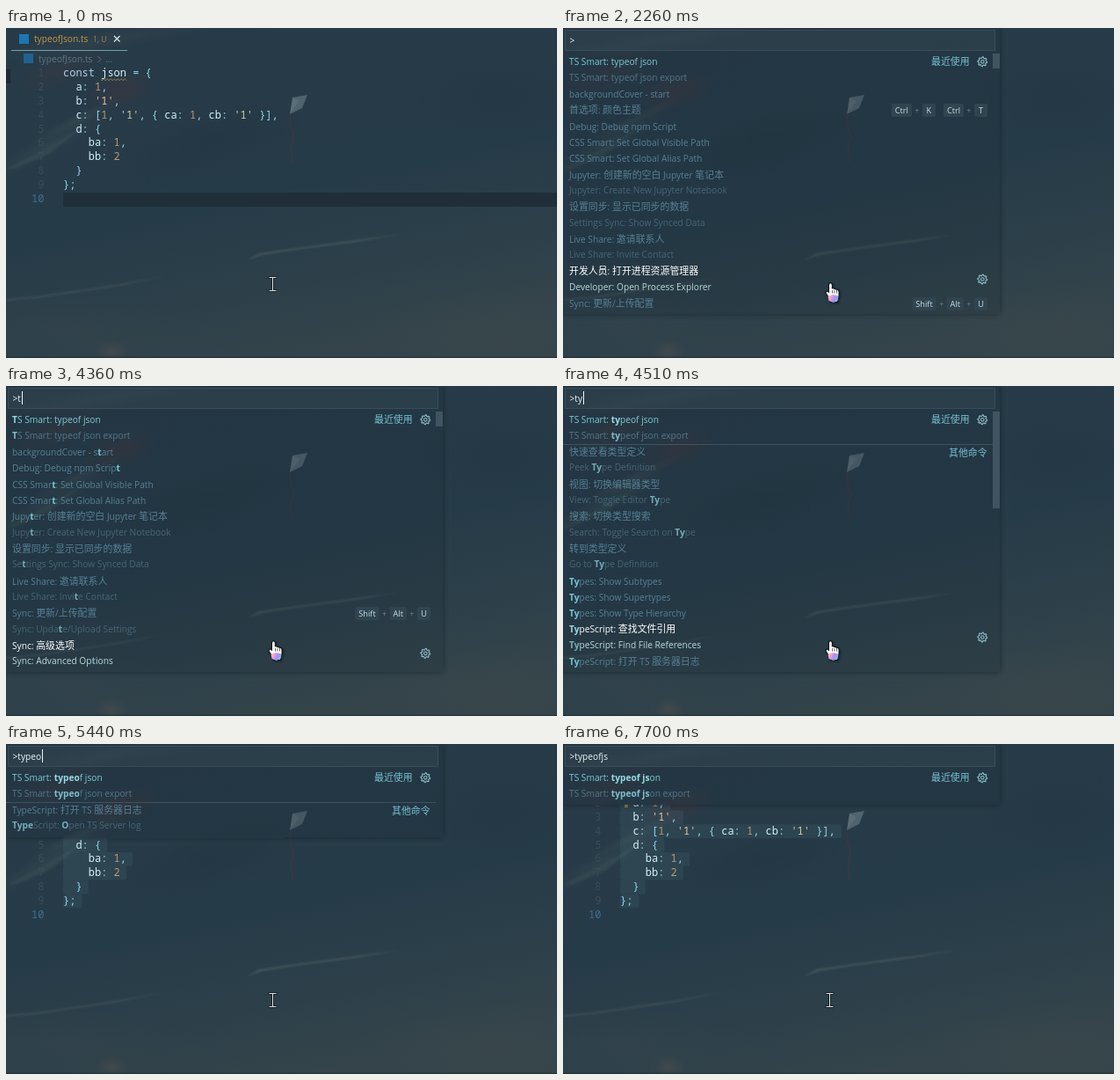
An HTML page with a canvas for the animation above (8000 ms loop, 627x375 px).

```html
<!DOCTYPE html>
<html lang="en">
<head>
<meta charset="utf-8">
<title>Command palette</title>
<style>
html, body { margin: 0; width: 100%; height: 100%; overflow: hidden; background: #263a47; }
canvas { display: block; }
</style>
</head>
<body>
<canvas id="stage" width="627" height="375"></canvas>
<script>
const W = 627, H = 375, LOOP = 8000;
const ctx = document.getElementById('stage').getContext('2d');
const LATIN = '"Open Sans", "Noto Sans", sans-serif';
const CJK = '"Noto Sans CJK SC", "Noto Sans CJK", sans-serif';
const MONO = '12px "Noto Sans Mono", "DejaVu Sans Mono", monospace';
const CHAR = 7.2, LINE = 15.83, ROW = 18.33;

function rect(c, x, y, w, h, color, r = 0) {
  c.fillStyle = color;
  c.beginPath();
  c.roundRect(x, y, w, h, r);
  c.fill();
}

function poly(c, pts, color) {
  c.fillStyle = color;
  c.beginPath();
  for (let i = 0; i < pts.length; i += 2) c.lineTo(pts[i], pts[i + 1]);
  c.closePath();
  c.fill();
}

// Latin and Chinese runs use their own font; returns the end x.
function text(str, x, y, color, { size = 10.2, weight = 400 } = {}) {
  ctx.fillStyle = color;
  for (const run of str.match(/[\u4e00-\u9fff]+|[^\u4e00-\u9fff]+/g) || []) {
    const han = run.charCodeAt(0) > 0x4dff;
    ctx.font = `${weight} ${han ? size * 1.07 : size}px ${han ? CJK : LATIN}`;
    ctx.fillText(run, x, y + 3.7);
    x += ctx.measureText(run).width;
  }
  return x;
}

// ---- backdrop, painted once ----
function paintBackdrop() {
  const cv = document.createElement('canvas');
  cv.width = W;
  cv.height = H;
  const c = cv.getContext('2d');
  const sky = c.createLinearGradient(260, 0, 340, H);
  sky.addColorStop(0, '#273a47');
  sky.addColorStop(0.5, '#263b48');
  sky.addColorStop(0.78, '#2d404a');
  sky.addColorStop(1, '#34444a');
  c.fillStyle = sky;
  c.fillRect(0, 0, W, H);

  const glow = (x, y, rx, ry, turn, rgb, a) => {
    c.save();
    c.translate(x, y);
    c.rotate(turn);
    c.scale(rx, ry);
    const g = c.createRadialGradient(0, 0, 0, 0, 0, 1);
    g.addColorStop(0, `rgba(${rgb},${a})`);
    g.addColorStop(1, `rgba(${rgb},0)`);
    c.fillStyle = g;
    c.fillRect(-1, -1, 2, 2);
    c.restore();
  };
  glow(130, 72, 46, 20, -0.3, '110,45,48', 0.2);
  glow(60, 48, 60, 20, -0.4, '105,55,55', 0.14);
  glow(110, 14, 130, 12, -0.15, '80,92,98', 0.2);
  glow(45, 135, 85, 12, -0.5, '95,125,115', 0.13);
  glow(80, 105, 60, 7, -0.45, '120,140,120', 0.12);
  glow(230, 130, 120, 40, -0.3, '25,45,60', 0.25);
  glow(120, 367, 20, 13, 0, '105,90,82', 0.3);
  glow(60, 340, 150, 40, 0, '60,72,76', 0.25);
  glow(560, 350, 160, 60, 0, '66,76,78', 0.25);
  glow(560, 80, 120, 60, 0, '32,50,66', 0.3);

  c.filter = 'blur(.8px)';
  poly(c, [274, 264, 288, 256, 330, 250, 398, 241, 450, 234, 400, 243, 330, 252, 292, 258], 'rgba(125,135,128,.3)');
  poly(c, [0, 308, 35, 305, 130, 291, 185, 281, 130, 293, 35, 307, 0, 310], 'rgba(125,130,122,.24)');
  poly(c, [0, 160, 40, 140, 88, 112, 50, 143, 10, 160], 'rgba(120,145,130,.1)');
  c.filter = 'blur(.5px)';
  poly(c, [326, 79, 343, 76, 337, 91, 323, 98], 'rgba(125,145,152,.48)');
  poly(c, [326, 79, 334, 83, 323, 98], 'rgba(170,180,180,.12)');
  c.strokeStyle = 'rgba(110,52,62,.24)';
  c.lineWidth = 2;
  c.beginPath();
  c.moveTo(324, 98);
  c.bezierCurveTo(320, 115, 332, 120, 325, 132);
  c.bezierCurveTo(322, 140, 328, 145, 326, 154);
  c.stroke();
  c.filter = 'none';
  rect(c, 0, 373.5, W, 1.5, 'rgba(20,30,38,.35)');
  return cv;
}
const backdrop = paintBackdrop();

// ---- editor ----
const CODE = [
  'const json = {', '  a: 1,', "  b: '1',", "  c: [1, '1', { ca: 1, cb: '1' }],",
  '  d: {', '    ba: 1,', '    bb: 2', '  }', '};', ''
];
const lineY = i => 51 + i * LINE;

function tokenColor(tok) {
  if (tok === 'const') return '#b3cde6';
  if (/^\d/.test(tok)) return '#c09672';
  if (/^'/.test(tok)) return '#dccb9c';
  if (/^\w/.test(tok)) return '#d3f1f7';
  return '#8fd6e8';
}

function drawSelection(color) {
  CODE.slice(0, 9).forEach((s, i) =>
    rect(ctx, 65, lineY(i) - 7.2, (s.length + 1) * CHAR, LINE, color, 2));
}

function drawCode() {
  CODE.forEach((s, i) => {
    const base = lineY(i) + 4.3;
    ctx.font = MONO;
    ctx.textAlign = 'right';
    ctx.fillStyle = i === 9 ? '#416f91' : '#3a4d59';
    ctx.fillText(i + 1, 43.5, base);
    ctx.textAlign = 'left';
    for (const m of s.matchAll(/'\d'|\w+|[^\w\s']/g)) {
      ctx.fillStyle = tokenColor(m[0]);
      ctx.fillText(m[0], 65 + m.index * CHAR, base);
    }
  });
  ctx.strokeStyle = '#a58748';
  ctx.lineWidth = 0.9;
  ctx.beginPath();
  for (let x = 108; x <= 137; x++) ctx.lineTo(x, 58.7 + Math.sin(x * 1.57));
  ctx.stroke();
}

function drawTab() {
  rect(ctx, 15, 7, 11, 11, '#1c77b2');
  text('typeofJson.ts', 32, 12.5, '#bf9a48');
  text('1, U', 99, 12.5, '#a3863f', { size: 8.6 });
  ctx.strokeStyle = '#dce6ea';
  ctx.lineWidth = 1.2;
  ctx.beginPath();
  ctx.moveTo(123, 9); ctx.lineTo(129.5, 15.5);
  ctx.moveTo(129.5, 9); ctx.lineTo(123, 15.5);
  ctx.stroke();
  rect(ctx, 6, 25, 132, 1, '#6fa3ad');
  rect(ctx, 20, 29, 11, 11, '#20638f');
  text('typeofJson.ts', 37, 35.5, '#5f7884');
  ctx.strokeStyle = '#5f7884';
  ctx.lineWidth = 1;
  ctx.beginPath();
  ctx.moveTo(104.5, 32); ctx.lineTo(108, 35.5); ctx.lineTo(104.5, 39);
  ctx.stroke();
  text('...', 113, 35.5, '#5f7884');
  rect(ctx, 0, 47, 5, 16, 'rgba(22,34,43,.6)');
}

function drawBulb() {
  ctx.fillStyle = '#e0bd2c';
  ctx.beginPath();
  ctx.arc(72, 64.8, 3.9, 0, 7);
  ctx.fill();
  rect(ctx, 70.2, 67, 3.6, 2.8, '#e0bd2c');
  rect(ctx, 70.2, 70.6, 3.6, 1.2, '#c2a42b');
}

function drawEditor(t) {
  const selected = t >= 860;
  if (selected) drawSelection(t < 1790 ? 'rgba(86,132,143,.36)' : 'rgba(86,125,138,.15)');
  else rect(ctx, 65, 187, W - 65, 16, '#1f2e39');
  drawTab();
  drawCode();
  if ((t >= 240 && t < 710) || (t >= 860 && t < 1330)) rect(ctx, 65, 187, 1, 16, '#8fc3cc');
  if (t >= 1090) drawBulb();
}

// ---- palette ----
// "~" marks the second line of an entry.
const RECENT = [
  'TS Smart: typeof json', '~TS Smart: typeof json export', 'backgroundCover - start',
  '首选项: 颜色主题', 'Debug: Debug npm Script', 'CSS Smart: Set Global Visible Path',
  'CSS Smart: Set Global Alias Path', 'Jupyter: 创建新的空白 Jupyter 笔记本',
  '~Jupyter: Create New Jupyter Notebook', '设置同步: 显示已同步的数据',
  '~Settings Sync: Show Synced Data', 'Live Share: 邀请联系人', '~Live Share: Invite Contact'
];
const TOP = RECENT.slice(0, 2);
const LISTS = {
  all: {
    rows: [...RECENT, '开发人员: 打开进程资源管理器', '~Developer: Open Process Explorer', 'Sync: 更新/上传配置'],
    hover: 13, thumb: 17, keys: { 3: 'Ctrl + K | Ctrl + T', 15: 'Shift + Alt + U' }
  },
  t: {
    rows: [...RECENT.filter((_, i) => i !== 3), 'Sync: 更新/上传配置', '~Sync: Update/Upload Settings',
      'Sync: 高级选项', '~Sync: Advanced Options'],
    hover: 14, thumb: 17, keys: { 12: 'Shift + Alt + U' }
  },
  typ: {
    rows: [...TOP, '快速查看类型定义', '~Peek Type Definition', '视图: 切换编辑器类型',
      '~View: Toggle Editor Type', '搜索: 切换类型搜索', '~Search: Toggle Search on Type',
      '转到类型定义', '~Go to Type Definition', 'Types: Show Subtypes', 'Types: Show Supertypes',
      'Types: Show Type Hierarchy', 'TypeScript: 查找文件引用', '~TypeScript: Find File References',
      'TypeScript: 打开 TS 服务器日志'],
    hover: 13, thumb: 187, split: true
  },
  typeo: { rows: [...TOP, 'TypeScript: 打开 TS 服务器日志', '~TypeScript: Open TS Server log'], split: true },
  typeof: { rows: TOP }
};

function listFor(q) {
  if (!q) return LISTS.all;
  if (q === 't') return LISTS.t;
  if (q === 'ty') return { ...LISTS.typ, thumb: 110 };
  if (q.length < 5) return LISTS.typ;
  return q === 'typeo' ? LISTS.typeo : LISTS.typeof;
}

// Indices of matching letters: a whole run first, else in scattered order.
function matches(str, q) {
  const hit = new Set();
  if (!q) return hit;
  const run = new RegExp([...q].join(' ?'), 'i').exec(str);
  if (run) {
    for (let i = 0; i < run[0].length; i++) hit.add(run.index + i);
    return hit;
  }
  let at = -1;
  for (const ch of q) {
    at = str.toLowerCase().indexOf(ch, at + 1);
    if (at < 0) return new Set();
    hit.add(at);
  }
  return hit;
}

function drawLabel(str, q, y, color, bold, weight) {
  const hit = matches(str, q);
  let x = 7;
  for (let i = 0, j; i < str.length; i = j) {
    j = i + 1;
    while (j < str.length && hit.has(j) === hit.has(i)) j++;
    const on = hit.has(i);
    x = text(str.slice(i, j), x, y, on ? bold : color, { weight: on ? 700 : weight });
  }
}

function drawGear(y) {
  ctx.strokeStyle = '#8cc0c9';
  ctx.lineWidth = 1.1;
  ctx.beginPath();
  for (let i = 0; i <= 32; i++) {
    const a = i / 32 * Math.PI * 2, r = i % 4 < 2 ? 5.4 : 4.1;
    ctx.lineTo(477.3 + r * Math.cos(a), y + r * Math.sin(a));
  }
  ctx.stroke();
  ctx.beginPath();
  ctx.arc(477.3, y, 1.8, 0, 7);
  ctx.stroke();
}

function drawKeys(keys, y) {
  const size = 9.2;
  let x = 483;
  for (const k of keys.split(' ').reverse()) {
    if (k === '|') { x -= 9; continue; }
    ctx.font = `${size}px ${LATIN}`;
    const w = ctx.measureText(k).width;
    if (k === '+') {
      text(k, x - 6 - w / 2, y, '#68858f', { size });
      x -= 12;
    } else {
      const box = Math.max(w + 8, 15);
      rect(ctx, x - box, y - 7.5, box, 15, '#31444f', 2);
      text(k, x - box / 2 - w / 2, y, '#bfe2e8', { size });
      x -= box;
    }
  }
}

function drawRow(row, i, q, list) {
  const sub = row[0] === '~', str = sub ? row.slice(1) : row;
  const y = 38.5 + i * ROW - (sub ? 0.9 : 0);
  const hot = list.hover && i - (sub ? 1 : 0) === list.hover;
  let color = sub ? '#486676' : '#578096', bold = sub ? '#74adb9' : '#78c6d4';
  if (i === 0) { color = '#7accd9'; bold = '#94dde6'; }
  if (i === 1) { color = '#54788a'; bold = '#80c0cc'; }
  if (hot) { color = sub ? '#b8dadd' : '#ffffff'; bold = sub ? '#78b0b7' : '#98dae3'; }
  drawLabel(str, q, y, color, bold, hot ? 500 : 400);
  if (hot && !sub) drawGear(y + 8.7);
}

function drawPalette(q, caret) {
  const list = listFor(q), h = Math.round(32.2 + list.rows.length * ROW);
  ctx.save();
  ctx.shadowColor = 'rgba(10,18,25,.55)';
  ctx.shadowBlur = 7;
  rect(ctx, 0, 0, 497, h, '#263a47');
  ctx.restore();
  ctx.drawImage(backdrop, 0, 0, 497, h, 0, 0, 497, h);
  rect(ctx, 0, 0, 497, h, 'rgba(28,42,52,.2)');

  rect(ctx, 2, 2, 490, 24, 'rgba(62,82,93,.28)');
  ctx.strokeStyle = '#3a4e5a';
  ctx.lineWidth = 1;
  ctx.strokeRect(2.5, 2.5, 489, 23);
  const end = text('>' + q, 7.5, 14.2, '#f0f7f9');
  if (caret) rect(ctx, Math.round(end + 1), 6, 1, 15, '#f0f7f9');

  list.rows.forEach((row, i) => drawRow(row, i, q, list));
  text('最近使用', 419, 38.5, '#76c2d3');
  drawGear(38.3);
  if (list.split) {
    rect(ctx, 0, 66, 489, 1, '#3f535e');
    text('其他命令', 439, 76.3, '#76c2d3');
  }
  for (const i in list.keys) drawKeys(list.keys[i], 38.5 + i * ROW);
  if (list.thumb) rect(ctx, 489, 29, 8, list.thumb, 'rgba(92,114,126,.5)');
}

// ---- pointer ----
function drawBeam() {
  const stroke = (color, w) => {
    ctx.strokeStyle = color;
    ctx.lineWidth = w;
    ctx.beginPath();
    ctx.moveTo(300, 283.5); ctx.lineTo(307, 283.5);
    ctx.moveTo(300, 298.5); ctx.lineTo(307, 298.5);
    ctx.moveTo(303.5, 283.5); ctx.lineTo(303.5, 298.5);
    ctx.stroke();
  };
  ctx.lineCap = 'square';
  stroke('#10171c', 2.6);
  stroke('#dfe5e8', 1);
  ctx.lineCap = 'butt';
}

function drawHand() {
  const g = ctx.createLinearGradient(301, 302, 314, 309);
  g.addColorStop(0, '#f4d95c');
  g.addColorStop(0.35, '#f5a0d8');
  g.addColorStop(0.65, '#a58cf5');
  g.addColorStop(1, '#6fd8f0');
  const hand = new Path2D('M303 292q0-1.7 1.4-1.7t1.4 1.7v4.6q2.2-.7 2.6.6q2-.4 2.4.7q2.7-.3 2.7 1.8v4.2l-1.6 3.4v3.4h-7.4v-3l-4.6-6q-.8-1.8.8-2.2l2.3 1.8z');
  ctx.save();
  ctx.shadowColor = 'rgba(0,0,0,.6)';
  ctx.shadowBlur = 3;
  ctx.shadowOffsetX = ctx.shadowOffsetY = 1;
  ctx.strokeStyle = '#0c0f12';
  ctx.lineWidth = 2;
  ctx.stroke(hand);
  ctx.restore();
  ctx.fillStyle = '#fff';
  ctx.fill(hand);
  for (const x of [306, 308.6, 311]) rect(ctx, x, 298, 0.7, 3.5, '#20252a');
  poly(ctx, [301.5, 304.5, 307.5, 303, 313.5, 304.5, 312.5, 310, 307.5, 312, 302.5, 310], g);
}

// ---- timeline: [start, typed text, caret shown] ----
const STEPS = [
  [1790, '', 1], [2260, '', 0], [2800, '', 1], [3350, '', 0], [3890, '', 1],
  [4360, 't', 1], [4510, 'ty', 1], [4830, 'typ', 1], [5200, 'type', 1], [5440, 'typeo', 1],
  [5610, 'typeof', 1], [6150, 'typeof', 0], [6690, 'typeof', 1],
  [6770, 'typeofj', 1], [7230, 'typeofjs', 1], [7700, 'typeofjs', 0]
];

function draw(t) {
  ctx.drawImage(backdrop, 0, 0);
  drawEditor(t);
  const step = STEPS.findLast(s => s[0] <= t);
  if (step) drawPalette(step[1], step[2]);
  if (t >= 1720 && t < 5440) drawHand();
  else drawBeam();
}

const start = performance.now();
function tick() {
  draw((performance.now() - start) % LOOP);
  requestAnimationFrame(tick);
}
tick();
</script>
</body>
</html>
```
